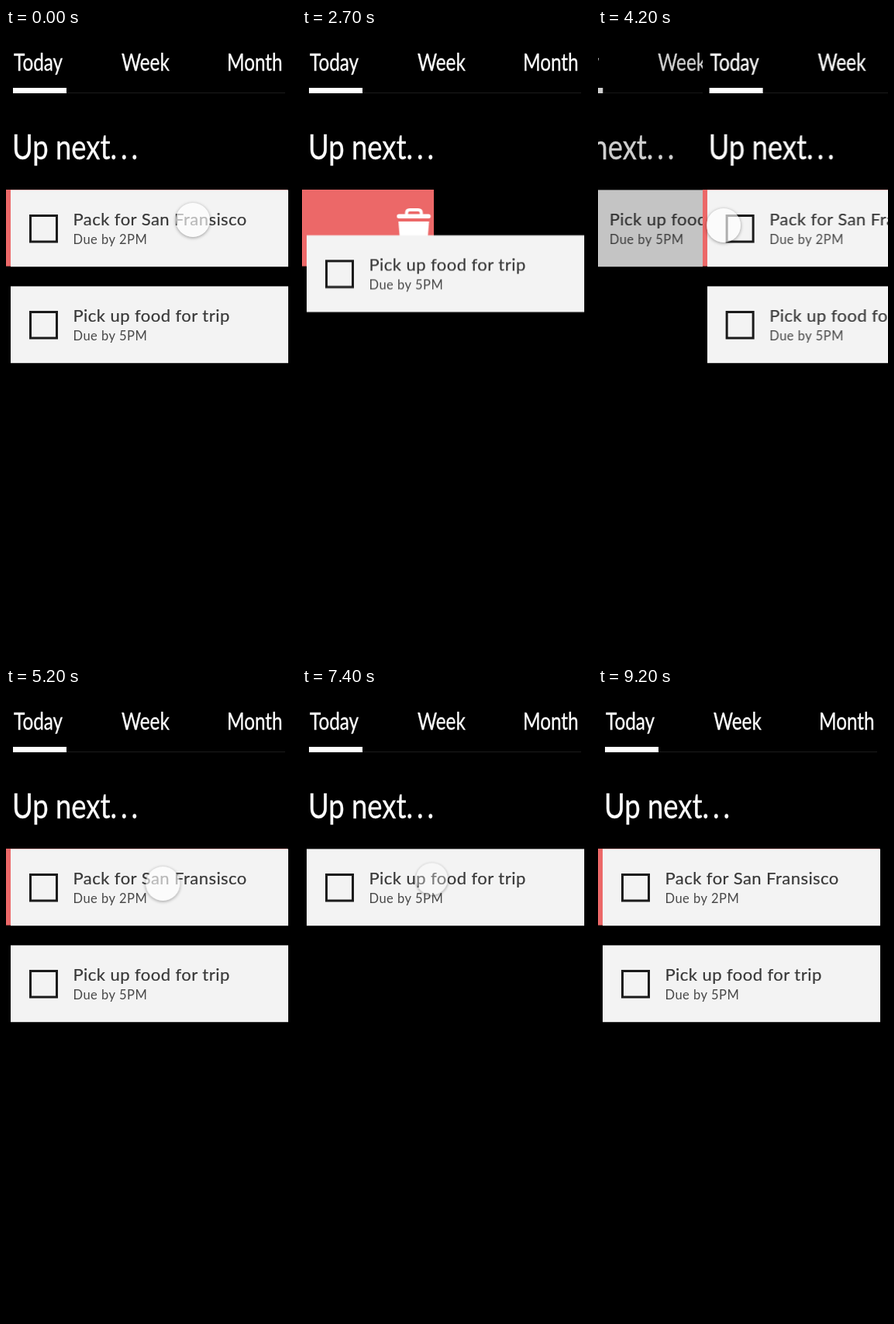
An HTML page for the animation above (10000 ms loop, 374 by 812 pixels).

```html
<!DOCTYPE html>
<html lang="en">
<head>
<meta charset="utf-8">
<title>To-do list</title>
<style>
  html, body { margin: 0; width: 100%; height: 100%; overflow: hidden; background: #000; }
  .stage { position: absolute; left: 0; top: 0; width: 374px; height: 812px; overflow: hidden; }
  .page { position: absolute; left: 0; top: 0; width: 374px; height: 812px; background: #000; }
  .a, .b, .page g, .shade, .dot, .arrow { animation: 10s linear infinite; }

  text { font-family: Lato, "Open Sans", sans-serif; white-space: pre; }
  .head text { fill: #fff; stroke: #fff; stroke-width: .35px; }
  .tab { font-size: 30px; }
  .big { font-size: 45px; }
  .title { font-size: 22px; letter-spacing: .45px; fill: #383838; stroke: #383838; stroke-width: .2px; }
  .due { font-size: 16.5px; letter-spacing: .5px; fill: #484848; }
  .card { fill: #f3f3f3; }
  .box { fill: none; stroke: #1b1b1b; stroke-width: 3; }

  /* page push: new page covers, old page drifts and darkens */
  .page.a { animation-name: pageA; }
  .page.b { animation-name: pageB; z-index: 2; }
  @keyframes pageA {
    0%, 39.78% { transform: translateX(0); z-index: 1; animation-timing-function: ease; }
    45.78%, 50% { transform: translateX(-112px); z-index: 1; }
    50.01% { transform: translateX(374px); z-index: 3; }
    75.78% { transform: translateX(374px); z-index: 3; animation-timing-function: ease; }
    81.78%, 100% { transform: translateX(0); z-index: 3; }
  }
  @keyframes pageB {
    0%, 39.78% { transform: translateX(374px); animation-timing-function: ease; }
    45.78%, 75.78% { transform: translateX(0); animation-timing-function: ease; }
    81.78% { transform: translateX(-112px); }
    81.79%, 100% { transform: translateX(374px); }
  }
  .shade { opacity: 0; }
  .a .shade { animation-name: shadeA; }
  .b .shade { animation-name: shadeB; }
  @keyframes shadeA {
    0%, 39.78% { opacity: 0; animation-timing-function: ease; }
    45.78%, 50% { opacity: .3; }
    50.01%, 100% { opacity: 0; }
  }
  @keyframes shadeB {
    0%, 75.78% { opacity: 0; animation-timing-function: ease; }
    81.78% { opacity: .3; }
    81.79%, 100% { opacity: 0; }
  }

  /* first card is dragged away */
  .a .first { animation-name: dragA; }
  .b .first { animation-name: dragB; }
  @keyframes dragA {
    0%, 17.5% { transform: translateX(0); animation-timing-function: cubic-bezier(.4, 0, .6, 1); }
    25.6%, 50% { transform: translateX(-365px); }
    50.01%, 100% { transform: translateX(0); }
  }
  @keyframes dragB {
    0%, 57.5% { transform: translateX(0); animation-timing-function: cubic-bezier(.4, 0, .6, 1); }
    63% { transform: translateX(-349px); }
    63.4%, 90% { transform: translateX(-365px); }
    90.01%, 100% { transform: translateX(0); }
  }

  /* delete panel leaves while the second card rises */
  .bin { --out: translateX(-364px); }
  .second { --out: translateY(-124px); }
  .a .bin, .a .second { animation-name: closeA; }
  .b .bin, .b .second { animation-name: closeB; }
  @keyframes closeA {
    0%, 25.91% { transform: translate(0); animation-timing-function: cubic-bezier(.16, 1, .3, 1); }
    35.91%, 50% { transform: var(--out); }
    50.01%, 100% { transform: translate(0); }
  }
  @keyframes closeB {
    0%, 63.36% { transform: translate(0); animation-timing-function: cubic-bezier(.16, 1, .3, 1); }
    73.36%, 90% { transform: var(--out); }
    90.01%, 100% { transform: translate(0); }
  }

  .dot {
    position: absolute; z-index: 5; left: -22px; top: -22px; width: 44px; height: 44px;
    border-radius: 50%; box-shadow: 0 1px 4px rgba(0, 0, 0, .38);
    animation-name: move, press;
  }
  @keyframes move {
    0%, 17.5% { translate: 241px 247px; opacity: 1; animation-timing-function: cubic-bezier(.4, 0, .6, 1); }
    25.6% { translate: -124px 247px; opacity: 1; }
    25.61%, 38.94% { translate: 162px 254px; opacity: 0; }
    38.95%, 50.5% { translate: 162px 254px; opacity: 1; animation-timing-function: ease-in-out; }
    54.9%, 57.5% { translate: 326px 250px; opacity: 1; animation-timing-function: cubic-bezier(.4, 0, .6, 1); }
    63% { translate: -23px 247px; opacity: 1; }
    63.01%, 73.94% { translate: 167.5px 247px; opacity: 0; }
    73.95%, 87.5% { translate: 167.5px 247px; opacity: 1; animation-timing-function: ease-in; }
    91.8% { translate: 284px -28px; opacity: 1; }
    91.81%, 100% { translate: 284px -28px; opacity: 0; }
  }
  @keyframes press {
    0%, 16.3%, 40.6%, 56.3%, 76.4%, 100% { scale: 1; background: rgba(255, 255, 255, .65); }
    16.95%, 39.8%, 56.95%, 75.6% { scale: .94; background: rgba(255, 255, 255, .35); }
    50% { scale: 1; background: rgba(255, 255, 255, .65); }
    70% { scale: .94; background: rgba(255, 255, 255, .35); }
  }

  .arrow { position: absolute; z-index: 5; left: 0; top: 0; opacity: 0; animation-name: blink; }
  @keyframes blink {
    0%, 62.5% { opacity: 0; }
    62.51%, 63.5% { opacity: 1; }
    63.51%, 100% { opacity: 0; }
  }
</style>
</head>
<body>
<div class="stage" id="stage">
  <svg class="page a" id="page" viewBox="0 0 374 812">
    <g class="head">
      <text class="tab" transform="translate(10 55) scale(.81 1)">Today</text>
      <text class="tab" transform="translate(149 55) scale(.81 1)">Week</text>
      <text class="tab" transform="translate(285 55) scale(.81 1)">Month</text>
      <rect x="78" y="83" width="282" height="1" fill="#1c1c1c"/>
      <rect x="9" y="77" width="69" height="7" fill="#fff"/>
      <text class="big" transform="translate(8 169) scale(.81 1)">Up next<tspan letter-spacing="6">...</tspan></text>
    </g>
    <g class="bin">
      <rect y="208" width="363" height="98.6" fill="#ec6868"/>
      <path d="M327.500 241v-3q0-4 4-4h11q4 0 4 4v3" fill="none" stroke="#fff" stroke-width="4"/>
      <rect x="315" y="239.500" width="43.500" height="5.500" rx="2.500" fill="#fff"/>
      <path d="M317 249h39.500l-2.500 31q-.5 4.500-5 4.500h-24.500q-4.500 0-5-4.500z" fill="#fff"/>
    </g>
    <g class="first">
      <rect class="card" x="6" y="208.400" width="358" height="98.800"/>
      <rect class="box" x="31.500" y="241.500" width="34" height="33.500"/>
      <text class="title" x="86.500" y="254">Pack for San Fransisco</text>
      <text class="due" x="86.500" y="278">Due by 2PM</text>
    </g>
    <g class="second">
      <rect class="card" x="6" y="332.400" width="358" height="98.800"/>
      <rect class="box" x="31.500" y="365.500" width="34" height="33.500"/>
      <text class="title" x="86.500" y="378">Pick up food for trip</text>
      <text class="due" x="86.500" y="402">Due by 5PM</text>
    </g>
    <rect class="shade" width="374" height="812"/>
  </svg>
  <div class="dot"></div>
  <svg class="arrow" width="20" height="270">
    <path d="M-4 230v18l4-4 3 7 3-1.500-3-6.500h5z" fill="#000" stroke="#fff" stroke-width=".8"/>
  </svg>
</div>
<script>
  // the second page is the same list with its own timing
  const page = document.getElementById('page');
  const next = page.cloneNode(true);
  next.removeAttribute('id');
  next.setAttribute('class', 'page b');
  page.after(next);
</script>
</body>
</html>
```
